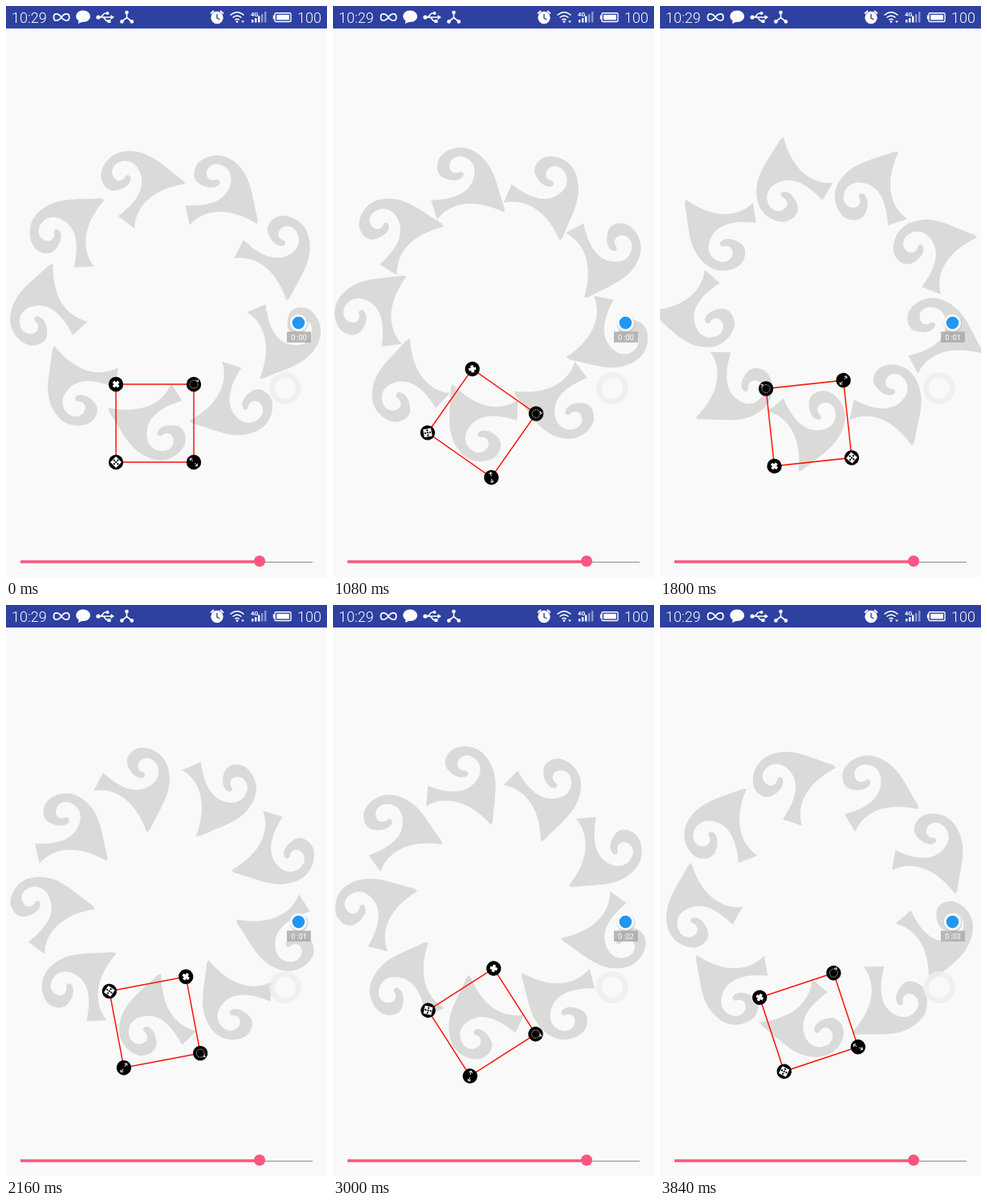
Recreate the animation shown at these times as an HTML page. Size 400 by 711 pixels, loop 3.96 s.

```html
<!DOCTYPE html>
<html lang="en">
<head>
<meta charset="utf-8">
<title>Rotating ring</title>
<style>
  html, body { margin: 0; width: 100%; height: 100%; overflow: hidden; background: #f9f9f9; }
  svg { display: block; width: 100%; height: 100%; }
  text { font-family: Roboto, "Open Sans", sans-serif; fill: #fff; }
  .line { fill: none; stroke: #fff; }
</style>
</head>
<body>
<svg viewBox="0 0 400 711">
  <defs>
    <path id="petal" fill="#dadad9" d="M-58-19L-57-14C-46 2-37 21-25 32C-14 42-2 46 8 46C21 45.5 33 37 37.5 26
      C40.5 13 34 4 26 3C16 1 5 4 3 12C3 16 7 17 9 15C13 11 20 12 22 17C26 25 20 34.5 10 34.5
      C-2 35-10 26-10 14C-11-9 11-21 34-28L20.4-49.4C12-28-12-10-58-19Z"/>
    <path id="arrow" fill="#fff" d="M0-7L3.8-3.2H1.2V-1H-1.2V-3.2H-3.8Z"/>
  </defs>

  <g id="ring"></g>

  <g id="box">
    <rect x="-48.5" y="-48.5" width="97" height="97" fill="none" stroke="#f81408" stroke-width="1.5"/>
    <g transform="translate(-48.5 -48.5)">
      <circle r="9.2"/>
      <path class="line" stroke-width="3.6" d="M-3.2-3.2L3.2 3.2M3.2-3.2L-3.2 3.2"/>
    </g>
    <g transform="translate(48.5 -48.5)">
      <circle r="9.2"/>
      <circle class="line" r="5" stroke-width=".8" stroke-dasharray="1.6 .7" opacity=".8"/>
      <path class="line" stroke-width=".9" d="M2.6-5.6L5.2-3L5.6-6"/>
    </g>
    <g transform="translate(-48.5 48.5)">
      <circle r="9.2"/>
      <use href="#arrow"/>
      <use href="#arrow" transform="rotate(90)"/>
      <use href="#arrow" transform="rotate(180)"/>
      <use href="#arrow" transform="rotate(270)"/>
    </g>
    <g transform="translate(48.5 48.5)">
      <circle r="9.2"/>
      <path class="line" stroke-width=".9" d="M-1.2-1.2L-4.4-4.4M-4.6-1.6V-4.6H-1.6M1.2 1.2L4.4 4.4M4.6 1.6V4.6H1.6"/>
    </g>
  </g>

  <!-- floating buttons -->
  <circle cx="348" cy="476" r="20" fill="#efefec" opacity=".85"/>
  <circle cx="348" cy="476" r="13" fill="#fafaf9" opacity=".9"/>
  <circle cx="365" cy="395.6" r="11.4" fill="#bbb" opacity=".6"/>
  <circle cx="364.5" cy="394.6" r="10.6" fill="#fff"/>
  <circle cx="364.5" cy="394.6" r="7.8" fill="#2196f3"/>
  <rect x="350" y="405.5" width="30" height="13.5" fill="#a8a8a8" opacity=".8"/>
  <text id="timer" x="365" y="415.5" font-size="9" text-anchor="middle"></text>

  <!-- slider -->
  <path stroke="#8a8a8a" d="M316 692.5H382"/>
  <path stroke="#fb557f" stroke-width="3.6" d="M18 692H316"/>
  <circle cx="316" cy="691.3" r="7" fill="#ff5580"/>

  <!-- status bar -->
  <rect width="400" height="28" fill="#2e40a0"/>
  <g font-size="18" font-weight="300">
    <text x="7" y="20.8">10:29</text>
    <text x="363" y="20.8">100</text>
  </g>
  <path class="line" stroke-width="1.8" d="M69 14C65 8.5 59.5 8.5 59.5 14S65 19.5 69 14S78.8 8.5 78.8 14S73 19.5 69 14Z"/>
  <path fill="#fff" d="M96 5.5C101 5.5 105 8.8 105 13S101 20 96 20L94.5 20L90 22L90.5 18.3C88.5 17 87.3 15 87.3 13C87.3 8.8 91 5.5 96 5.5Z"/>
  <g fill="#fff">
    <path class="line" stroke-width="1.6" d="M114 14H131M117 14C121 14 120 9 124 9H126M120 14C124 14 123 19 127 19H128"/>
    <circle cx="115" cy="14" r="2.6"/>
    <path d="M130.5 11L135 14L130.5 17Z"/>
    <circle cx="126.5" cy="9" r="2"/>
    <path d="M126.5 17H130.5V21H126.5Z"/>
    <path class="line" stroke-width="1.6" d="M150.5 8V14.5L144 19.5M150.5 14.5L157 19.5"/>
    <circle cx="150.5" cy="8" r="2.3"/>
    <circle cx="144.4" cy="19.4" r="2.3"/>
    <circle cx="156.8" cy="19.4" r="2.3"/>
    <circle cx="263" cy="14.5" r="7.7"/>
    <path class="line" stroke-width="1.8" d="M255 9.5L259 6M271 9.5L267 6"/>
    <path fill="none" stroke="#2e40a0" stroke-width="1.4" d="M263 10V15L266.4 17"/>
    <path class="line" stroke-width="1.5" d="M279.5 11.5Q288 4 296.5 11.5M282.5 14.5Q288 9.7 293.5 14.5M285.3 17.3Q288 15.2 290.7 17.3"/>
    <circle cx="288" cy="19.6" r="1.4"/>
    <path d="M293 18.5H297L295 21Z"/>
    <text x="305" y="12.5" font-size="7.5" font-weight="700">4G</text>
    <path d="M306 17h2.4v3.5h-2.4zM310 15h2.4v5.5h-2.4zM314 12.5h2.4v8h-2.4z"/>
    <path opacity=".45" d="M318 10h2.4v10.5h-2.4zM322 7h2.4v13.5h-2.4z"/>
    <rect class="line" x="335" y="8.7" width="20" height="10.8" rx="1.5" stroke-width="1.4"/>
    <rect x="337.2" y="10.9" width="15.6" height="6.4"/>
    <rect x="332.8" y="11.5" width="1.8" height="5"/>
  </g>
</svg>
<script>
  const LOOP = 3960, HOLD = 840, STEP = 120, PETALS = 9;
  const ring = document.getElementById('ring');
  const box = document.getElementById('box');
  const timer = document.getElementById('timer');

  // [step, total turn in degrees]
  const keys = [[0, 0], [1, 6.8], [6, 104.9], [12, 439.3], [16, 608.2], [22, 939.6], [26, 1061.7]];

  function slope(i) {
    const a = keys[Math.max(i - 1, 0)], b = keys[Math.min(i + 1, keys.length - 1)];
    return (b[1] - a[1]) / (b[0] - a[0]);
  }

  // Hermite curve through the keys
  function turnAt(step) {
    let i = 0;
    while (i < keys.length - 2 && step >= keys[i + 1][0]) i++;
    const [k0, a0] = keys[i], [k1, a1] = keys[i + 1];
    const w = k1 - k0, u = (step - k0) / w, v = 1 - u;
    return v * v * (1 + 2 * u) * a0 + u * u * (3 - 2 * u) * a1
      + w * u * v * (v * slope(i) - u * slope(i + 1));
  }

  const petals = Array.from({ length: PETALS }, () => {
    const use = document.createElementNS('http://www.w3.org/2000/svg', 'use');
    use.setAttribute('href', '#petal');
    return ring.appendChild(use);
  });

  function place(el, turn, i) {
    el.setAttribute('transform',
      `translate(200 369.5) rotate(${i * 360 / PETALS}) translate(-14.5 150) rotate(${turn})`);
  }

  function draw() {
    const t = performance.now() % LOOP;
    const step = t < HOLD ? 0 : 1 + Math.floor((t - HOLD) / STEP);
    const turn = turnAt(step);
    petals.forEach((p, i) => place(p, turn, i));
    place(box, turn, 0);
    timer.textContent = '0 :0' + Math.floor(step / 8.5);
    requestAnimationFrame(draw);
  }
  draw();
</script>
</body>
</html>
```
